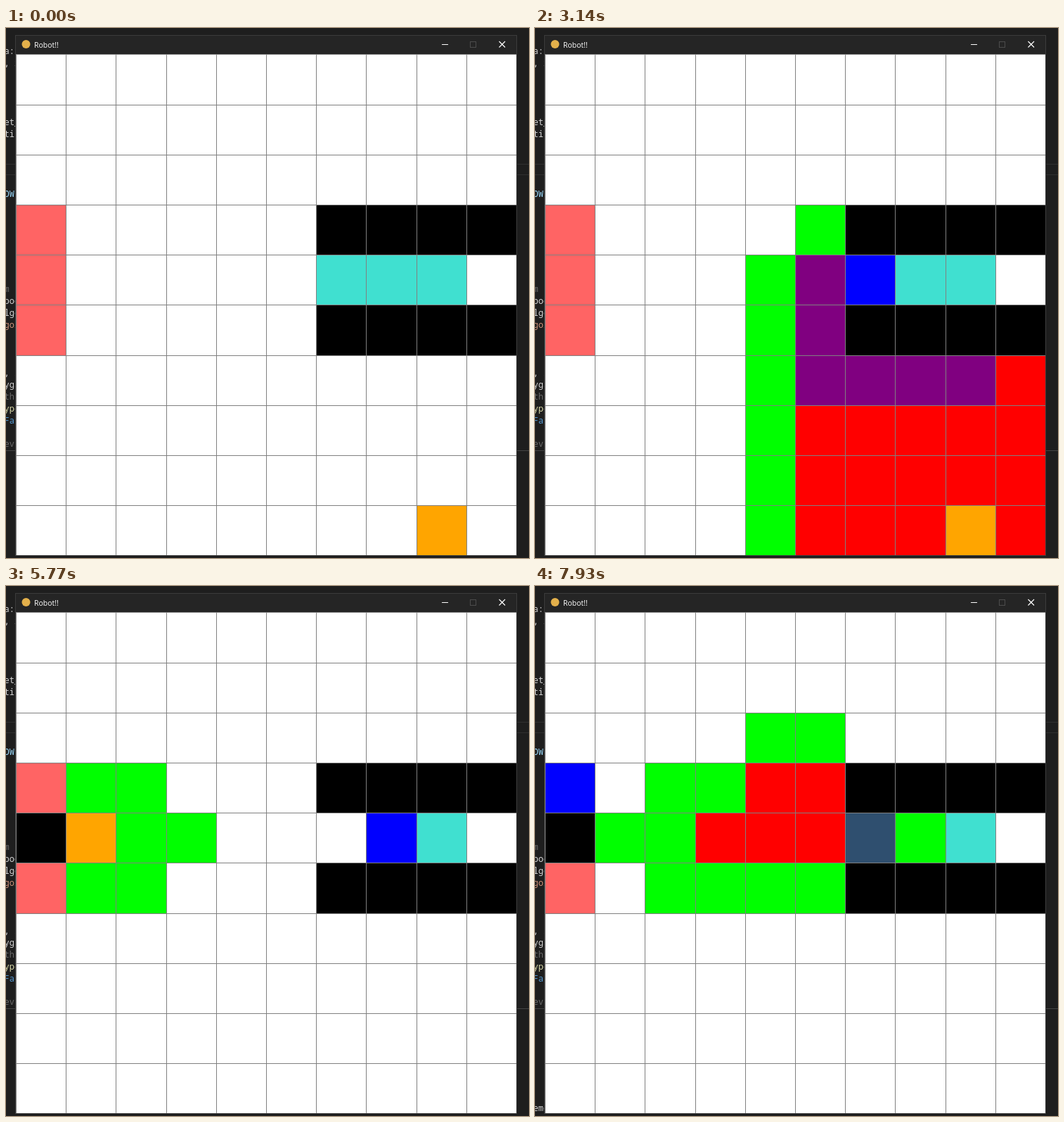
An HTML page that plays this animation: 744 by 753 pixels, repeating every 8000 ms.

```html
<!DOCTYPE html>
<html lang="en">
<head>
<meta charset="utf-8">
<title>Robot path finding</title>
<style>
  html, body { margin: 0; width: 100%; height: 100%; overflow: hidden; background: #1e1e1e; }
  svg { display: block; width: 744px; height: 753px; }
  .code { font: 12px "Noto Sans Mono", monospace; white-space: pre; }
  .title { font: 10.5px "Open Sans", sans-serif; fill: #fff; }
</style>
</head>
<body>
<svg id="stage" viewBox="0 0 744 753">
  <rect width="744" height="753" fill="#1e1e1e"/>
  <path d="M0 193.5H744M0 208.5H744" stroke="#303030"/>
  <path d="M0 600.5H744" stroke="#444"/>
  <g id="code" class="code"></g>
  <rect x="13" y="10" width="714" height="740" fill="#3c3c3c"/>
  <rect x="14" y="11" width="712" height="26" fill="#252525"/>
  <circle cx="28.5" cy="23" r="6" fill="#e3b04b"/>
  <text class="title" x="40" y="27.5">Robot!!</text>
  <path d="M620 23.5H629" stroke="#fff"/>
  <rect x="660.5" y="19.5" width="8" height="8" fill="none" stroke="#4c4c4c"/>
  <path d="M701.5 19L710 27.5M710 19L701.5 27.5" stroke="#fff" stroke-width="1.2"/>
  <g id="cells" shape-rendering="crispEdges"></g>
  <path id="lines" stroke="#808080" shape-rendering="crispEdges"/>
</svg>
<script>
const N = 10, LOOP = 8000;
const COLOR = {
  empty: '#fff', wall: '#000', item: '#40e0d0', slot: '#ff6464', goal: '#00f',
  open: '#0f0', closed: '#f00', path: '#800080', robot: '#ffa500', loaded: '#2f4f6f'
};
const gridX = i => Math.round(14 + 71.2 * i);
const gridY = i => Math.round(37.4 + 71.2 * i);
const id = (x, y) => y * N + x;
const dist = (a, b) => Math.abs(a % N - b % N) + Math.abs((a / N | 0) - (b / N | 0));

const walls = new Set(), items = new Set(), slots = new Set();
for (let x = 6; x < N; x++) walls.add(id(x, 3)).add(id(x, 5));
for (let x = 6; x < 9; x++) items.add(id(x, 4));
for (let y = 3; y < 6; y++) slots.add(id(0, y));

let robot = id(8, 9), loaded = false, goal = -1, marks = new Map();
const states = [];

function record() {
  states.push(Array.from({ length: N * N }, (_, c) => {
    if (c === robot) return loaded ? 'loaded' : 'robot';
    if (c === goal) return 'goal';
    if (walls.has(c)) return 'wall';
    if (items.has(c)) return 'item';
    if (slots.has(c)) return 'slot';
    return marks.get(c) || 'empty';
  }));
}

function neighbors(c) {
  const x = c % N, y = c / N | 0;
  return [[x + 1, y], [x - 1, y], [x, y + 1], [x, y - 1]]
    .filter(([u, v]) => u >= 0 && v >= 0 && u < N && v < N)
    .map(([u, v]) => id(u, v))
    .filter(n => !walls.has(n));
}

// A* towards whichever end is nearest to the cell being expanded
function search(ends) {
  const start = robot, cost = new Map([[start, 0]]), from = new Map();
  let queue = [{ cell: start, f: 0, order: 0 }], order = 0;
  marks = new Map();
  while (queue.length) {
    queue.sort((a, b) => a.f - b.f || a.order - b.order);
    const cell = queue.shift().cell;
    if (ends.has(cell)) { goal = cell; break; }
    goal = [...ends].reduce((a, b) => dist(cell, b) < dist(cell, a) ? b : a);
    for (const n of neighbors(cell)) {
      const g = cost.get(cell) + 1;
      if (g >= (cost.get(n) ?? Infinity)) continue;
      cost.set(n, g);
      from.set(n, cell);
      queue = queue.filter(q => q.cell !== n);
      queue.push({ cell: n, f: g + dist(n, goal), order: ++order });
      marks.set(n, 'open');
    }
    record();
    marks.set(cell, 'closed');
  }
  const route = [];
  for (let c = from.get(goal); c !== start; c = from.get(c)) {
    route.unshift(c);
    marks.set(c, 'path');
    record();
  }
  return route;
}

function walk(route) {
  marks = new Map(route.map(c => [c, 'path']));
  for (const c of route) {
    robot = c;
    marks.delete(c);
    record();
  }
}

let pickups = [];
for (let trip = 0; trip < 2; trip++) {
  walk(search(items));
  items.delete(goal);
  loaded = true;
  goal = -1;
  marks = new Map();
  pickups.push(states.length);
  record();
  walk(search(slots));
  slots.delete(goal);
  walls.add(goal);
  loaded = false;
}

// Runs of evenly spaced steps: first time, last time, count.
// A repeated time skips a step that never reaches the screen.
const times = [
  [0, 0, 0], [540, 1030, 6], [1120, 1340, 3], [1450, 2130, 8], [2220, 2400, 3],
  [2550, 2550, 1], [2550, 3320, 9], [3520, 3520, 1], [3660, 4050, 5], [4140, 4220, 2],
  [4380, 5160, 10], [5290, 5770, 6], [5920, 5920, 1], [5920, 6580, 8],
  [6780, 6780, 1], [6930, 7690, 10], [7780, 7930, 2]
].flatMap(([a, b, n]) => Array.from({ length: n }, (_, i) => a + (b - a) * i / Math.max(1, n - 1)));

// The field before the first search
const initial = states[0].map((s, c) =>
  c === id(8, 4) ? 'item' : s === 'open' ? 'empty' : s);

// Drawing
const NS = 'http://www.w3.org/2000/svg';
function add(parent, tag, attrs, text = '') {
  const el = document.createElementNS(NS, tag);
  for (const k in attrs) el.setAttribute(k, attrs[k]);
  el.textContent = text;
  return document.getElementById(parent).appendChild(el);
}

const LIGHT = '#d4d4d4', DIM = '#6a6a6a';
const codeLine = (y, text, fill = LIGHT) => add('code', 'text', { x: -2.5, y, fill }, text);
codeLine(37, ' a:');
codeLine(54, ', r');
codeLine(138, 'et_');
codeLine(155, 'tic');
codeLine(240, 'OWS', '#9cdcfe');
codeLine(375, 'm', DIM);
codeLine(392, 'boo');
codeLine(409, 'lgo');
codeLine(426, 'gor', '#ce9178');
codeLine(494, ', l');
codeLine(511, 'yga');
codeLine(528, ' th', DIM);
codeLine(545, 'ype', '#dcdcaa');
codeLine(562, 'Fal', '#569cd6');
codeLine(595, ' ev', DIM);
const output = codeLine(746, 'eme');

const cells = Array.from({ length: N * N }, (_, c) => {
  const x = c % N, y = c / N | 0;
  return add('cells', 'rect', {
    x: gridX(x), y: gridY(y),
    width: gridX(x + 1) - gridX(x), height: gridY(y + 1) - gridY(y)
  });
});
let d = '';
for (let i = 0; i < N; i++) d += `M${gridX(i) + .5} 37V749M14 ${gridY(i) + .5}H726`;
document.getElementById('lines').setAttribute('d', d);

let shown = null;
function render(t) {
  const step = times.filter(s => s <= t).length - 1;
  if (step === shown) return;
  shown = step;
  const state = step < 0 ? initial : states[step];
  state.forEach((s, c) => cells[c].setAttribute('fill', COLOR[s]));
  output.setAttribute('visibility', step >= pickups[1] ? 'visible' : 'hidden');
}

const began = performance.now();
function tick() {
  render((performance.now() - began) % LOOP);
  requestAnimationFrame(tick);
}
tick();
</script>
</body>
</html>
```
